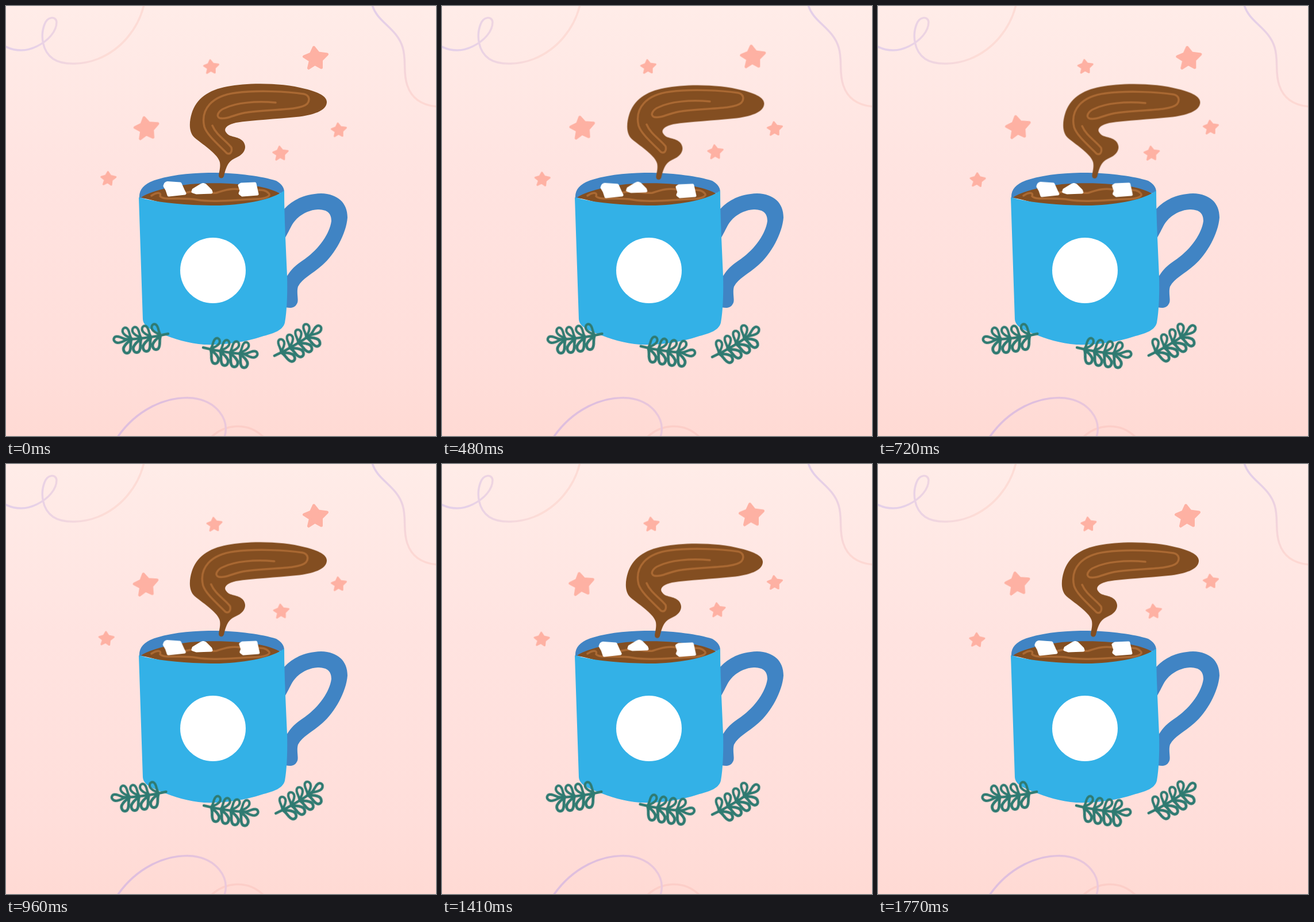
An HTML page without scripts that plays this animation: 748 px wide and 748 px high, repeating every 1.8 s.

```html
<!DOCTYPE html>
<html lang="en">
<head>
<meta charset="utf-8">
<title>Hot chocolate</title>
<style>
html, body { margin: 0; width: 100%; height: 100%; overflow: hidden; background: #ffe3df; }
svg { display: block; width: 100vw; height: 100vh; }
.line { fill: none; stroke-width: 3.5; stroke-linecap: round; stroke-linejoin: round; }
.swirl { stroke: #aa6933; }
.star { fill: #feb1a3; stroke: #feb1a3; stroke-width: 5; stroke-linejoin: round; }
.sprig { fill: none; stroke: #2f7a71; stroke-width: 4.4; stroke-linecap: round; stroke-linejoin: round; }
.sugar { fill: #fff; stroke: #fff; stroke-width: 5; stroke-linejoin: round; }
.choc { fill: #834e21; }
.dark { fill: #4084c4; }
.cup { fill: #33b1e7; }

/* Each part hops round a small box (--x, --y) while it drifts by (--dx, --dy) */
.hop {
  --u: 2.34px;
  --x: 0; --y: 0; --dx: 0; --dy: 0;
  animation: box 1.8s step-end infinite, drift 1.8s steps(6) infinite;
}
@keyframes box {
  0%, 52%, 87% { translate: 0 0; }
  7%, 72% { translate: 0 calc(var(--y) * var(--u)); }
  20% { translate: calc(var(--x) * var(--u)) calc(var(--y) * var(--u)); }
  33% { translate: calc(var(--x) * var(--u)) 0; }
}
@keyframes drift {
  from { transform: translate(0, 0); }
  to { transform: translate(calc(var(--dx) * var(--u)), calc(var(--dy) * var(--u))); }
}
</style>
</head>
<body>
<svg viewBox="0 0 748 748">
  <defs>
    <linearGradient id="sky" x2="0" y2="1">
      <stop offset="0" stop-color="#ffece8"/>
      <stop offset=".4" stop-color="#ffe3e0"/>
      <stop offset=".83" stop-color="#ffdeda"/>
      <stop offset="1" stop-color="#ffdad4"/>
    </linearGradient>
    <linearGradient id="fadeX" gradientUnits="userSpaceOnUse" x1="40" x2="170">
      <stop stop-color="#e5d0e8"/><stop offset="1" stop-color="#fddcd6"/>
    </linearGradient>
    <linearGradient id="fadeY" gradientUnits="userSpaceOnUse" x2="0" y1="20" y2="160">
      <stop stop-color="#e4cfe8"/><stop offset="1" stop-color="#fdd8d3"/>
    </linearGradient>
    <linearGradient id="fadeB" gradientUnits="userSpaceOnUse" x1="280" x2="390">
      <stop stop-color="#dfbfde"/><stop offset="1" stop-color="#ecc9da"/>
    </linearGradient>
    <path id="star" class="star" d="M-3-19L5-9 20-7 10 3 10 16-1 10-12 17-9 4-20-3-8-8Z"/>
    <path id="leaf" d="M0 0C9-1 14-9 21-7C28-3 22 5 15 4C9 4 5 1 0 0Z"/>
    <g id="pair">
      <use href="#leaf" transform="rotate(-53) scale(.95)"/>
      <use href="#leaf" transform="rotate(53) scale(1.1 -1.1)"/>
    </g>
    <g id="sprig" class="sprig">
      <path d="M1 0Q38 4 74 1"/>
      <use href="#pair" x="14" y="1"/>
      <use href="#pair" x="31" y="2"/>
      <use href="#pair" x="48" y="2"/>
      <use href="#pair" x="65" y="1"/>
      <use href="#leaf" x="72" y="1"/>
    </g>
  </defs>

  <rect width="748" height="748" fill="url(#sky)"/>
  <g class="line">
    <path stroke="url(#fadeX)" d="M-2 70C18 80 36 79 54 70C74 60 88 44 88 28C87 17 72 18 67 32C60 50 62 78 82 92C100 104 135 102 160 92C200 76 230 40 240-2"/>
    <path stroke="url(#fadeY)" d="M637-2C645 28 680 38 690 72C697 95 690 115 698 138C706 162 725 173 750 175"/>
    <path stroke="#fccec8" d="M357 750C380 728 420 722 448 750"/>
    <path stroke="url(#fadeB)" d="M194 750C225 705 275 678 325 682C365 687 390 718 380 750"/>
  </g>

  <!-- mug -->
  <path class="dark" d="M484 353C500 336 520 327 548 326C578 327 594 343 594 368C592 396 572 432 550 451C532 467 516 473 508 488C505 498 509 510 507 516C503 526 495 526 486 524L486 475C496 456 507 449 520 440C545 422 563 396 566 374C566 358 556 354 542 354C524 355 506 366 498 380C493 389 490 396 484 406Z"/>
  <path class="dark" d="M232 334C231 318 242 308 262 302C295 292 330 290 365 290C405 291 445 296 470 304C480 310 484 316 484 324L372 348Z"/>
  <path class="choc" d="M235 333C252 322 285 314 320 310C365 306 410 309 440 314C455 317 470 322 478 327L440 345 372 349 290 347Z"/>
  <path class="cup" d="M231 333C268 343 320 347 372 347C420 345 462 337 484 321C484 370 487 420 489 470C490 505 488 535 485 551C481 566 462 570 445 575C415 585 380 590 345 589C318 587 292 579 270 570C250 563 239 556 238 545Z"/>
  <g class="line swirl">
    <path d="M253 330C260 325 271 322 268 331C276 339 302 332 332 337C360 342 400 337 430 336C450 336 462 331 457 326C452 320 445 320 440 320"/>
    <path d="M312 325C335 319 348 327 366 325C384 319 394 317 408 319"/>
  </g>
  <circle cx="360" cy="460" r="57" fill="#fff"/>

  <!-- marshmallows -->
  <g class="hop" style="--x:1;--y:1;--dx:-.6;--dy:1">
    <path class="sugar" d="M276 313Q277 308 281 307.5L303 309 308 320 311 326 283 329 280 320Z"/>
  </g>
  <g class="hop" style="--x:-1;--y:-1">
    <path class="sugar" d="M325 323L326 320 339 312Q343 309 347 312L356 321 357 324 331 325Z"/>
  </g>
  <g class="hop" style="--x:1;--y:1;--dx:1.5;--dy:1">
    <path class="sugar" d="M406 312L409 310 433 309 437 327 411 329 407 326 409 321Z"/>
  </g>

  <!-- rising chocolate -->
  <g class="hop" style="--x:1;--y:1;--dy:.6">
    <path class="choc" d="M385 140C420 133 480 133 520 144C545 150 559 158 558 168C557 182 535 190 505 193C470 197 430 198 400 203C383 207 378 214 383 220C388 229 404 226 412 235C421 246 414 258 400 264C386 270 383 280 379 296Q376 302 371 298C368 294 374 284 372 272C369 258 345 243 328 229C317 219 319 200 323 187C331 161 352 146 385 140Z"/>
  </g>
  <g class="hop" style="--x:-1;--y:-1;--dx:-2;--dy:1">
    <path class="line swirl" d="M359 208C366 225 383 234 392 246C394 254 390 259 384 256C375 246 350 226 345 210C338 180 358 156 400 151C440 146 490 149 518 153C528 155 529 164 524 170C512 182 460 179 420 185C400 187 385 198 372 195C364 192 370 182 380 178C400 168 435 165 469 168"/>
  </g>

  <!-- stars -->
  <g class="hop" style="--dx:4.8;--dy:-.6"><use href="#star" transform="translate(357 106) scale(.62)"/></g>
  <g class="hop" style="--x:1;--y:-1"><use href="#star" transform="translate(538.5 91)"/></g>
  <g class="hop" style="--dx:-1;--dy:-2.4"><use href="#star" transform="translate(244.5 213) rotate(-4)"/></g>
  <g class="hop" style="--dy:-6"><use href="#star" transform="translate(579 216) scale(.62)"/></g>
  <g class="hop" style="--x:-1;--y:-1;--dx:1.2"><use href="#star" transform="translate(477.5 256.5) scale(.63)"/></g>
  <g class="hop" style="--x:-1;--dx:-3;--dy:3"><use href="#star" transform="translate(178 300.5) rotate(6) scale(.62)"/></g>

  <!-- sprigs -->
  <g class="hop" style="--x:-1;--dx:-3"><use href="#sprig" transform="translate(283 570) rotate(-7) scale(-1 1)"/></g>
  <g class="hop" style="--x:1;--y:-1;--dx:1"><use href="#sprig" transform="translate(342 594) rotate(8)"/></g>
  <g class="hop" style="--x:1;--y:1;--dx:2;--dy:-.6"><use href="#sprig" transform="translate(466 609) rotate(-31)"/></g>
</svg>
</body>
</html>
```
